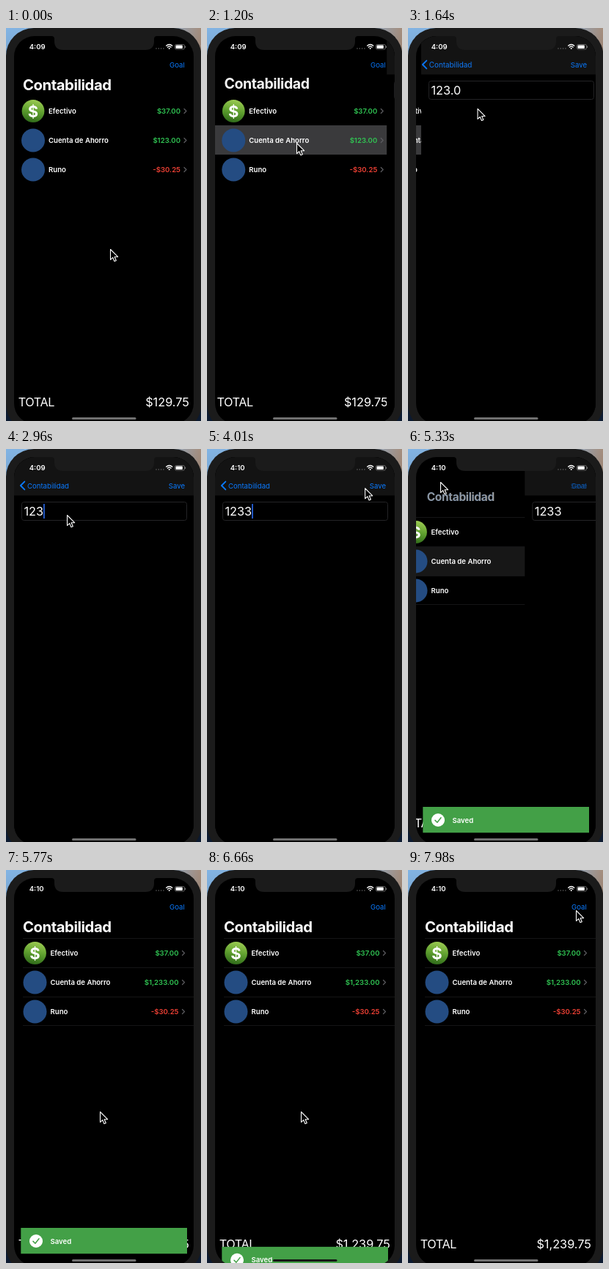
An HTML page for the animation above (8000 ms loop, 266 by 537 pixels).

```html
<!DOCTYPE html>
<html lang="es">
<head>
<meta charset="utf-8">
<title>Contabilidad</title>
<style>
  html, body { margin: 0; width: 100%; height: 100%; overflow: hidden; background: #000; }
  svg { display: block; width: 100vw; height: 100vh; }
  text { font: 400 9.6px Inter, Roboto, sans-serif; fill: #fff; }
  .bold { font-weight: 600; }
  .blue { fill: #0a7aff; }
  .end { text-anchor: end; }
  .total { font-size: 16.3px; }
  .line { fill: none; stroke-linecap: round; stroke-linejoin: round; }
</style>
</head>
<body>
<svg viewBox="0 0 266 537">
  <defs>
    <linearGradient id="desk"><stop stop-color="#82b4e4"/><stop offset=".85" stop-color="#8fa6bd"/><stop offset="1" stop-color="#a58d7c"/></linearGradient>
    <linearGradient id="dusk" x2="0" y2="1"><stop stop-opacity="0"/><stop offset=".9" stop-color="#0c1a30"/></linearGradient>
    <linearGradient id="cash" x1=".6" y1="0" x2=".4" y2="1">
      <stop stop-color="#9ccb52"/><stop offset=".5" stop-color="#5fa02f"/><stop offset="1" stop-color="#2f6a1a"/>
    </linearGradient>
    <linearGradient id="fade" gradientUnits="userSpaceOnUse" x1="205" x2="224">
      <stop stop-color="#fff"/><stop offset="1"/>
    </linearGradient>
    <mask id="fadeOut" maskUnits="userSpaceOnUse" width="266" height="70"><rect width="266" height="70" fill="url(#fade)"/></mask>
    <clipPath id="screen"><rect x="11" y="11" width="245" height="530" rx="28"/></clipPath>
  </defs>

  <rect width="266" height="537" fill="url(#desk)"/>
  <rect width="266" height="537" fill="url(#dusk)"/>
  <rect width="266.5" height="552" rx="38" fill="#1b1b1b"/>

  <g clip-path="url(#screen)">
    <rect width="266" height="537"/>

    <g id="list">
      <rect id="picked" x="11" y="133" width="320" height="40" fill="#3a3a3c"/>
      <path id="rules" d="M23 93.5H340M23 133.5H340M23 173.5H340M23 212.5H340" stroke="#151516"/>
      <g id="left"></g>
      <g id="right"></g>
      <text class="total" x="16.8" y="516.8" letter-spacing="-.5">TOTAL</text>
      <text class="total end" id="sum" x="250" y="516.8"></text>
    </g>

    <g id="detail">
      <rect x="11" width="245" height="537"/>
      <rect x="11" width="245" height="63.5" fill="#131313"/>
      <rect x="21.5" y="72.5" width="225" height="25" rx="3" stroke="#242426"/>
      <text id="value" x="24.5" y="90.8" style="font-size:16.3px"></text>
      <rect id="caret" y="75" width="1.6" height="20" fill="#2a6cf0"/>
    </g>

    <text id="big" class="bold" style="font-size:20.3px;font-weight:700;letter-spacing:-.45px">Contabilidad</text>
    <text id="small" class="blue">Contabilidad</text>
    <text id="goal" class="blue end" x="243.8" y="53.5">Goal</text>
    <text id="save" class="blue end" x="244" y="53.5">Save</text>
    <path id="back" class="line" d="M25.3 44.6L19.9 50L25.3 55.4" stroke="#0a7aff" stroke-width="1.9"/>
    <g mask="url(#fadeOut)"><text class="bold" id="heading" x="92" y="53.5">Cuenta de Ahorro</text></g>

    <path d="M62 11Q66 11 66 15V18Q66 30 78 30H190Q202 30 202 18V15Q202 11 206 11Z" fill="#1b1b1b"/>
    <text class="bold" id="clock" x="31.7" y="29"></text>
    <path class="line" d="M205 28h.01M208.3 28h.01M211.6 28h.01M214.9 28h.01" stroke="#777" stroke-width="1.3"/>
    <path class="line" d="M218.6 24.2Q222.7 20.8 226.8 24.2M220.3 26.2Q222.7 24.2 225.1 26.2" stroke="#fff" stroke-width="1.3"/>
    <circle cx="222.7" cy="28" r="1" fill="#fff"/>
    <rect x="230.5" y="22.5" width="13" height="6.6" rx="1.8" fill="none" stroke="#777" stroke-width=".8"/>
    <rect x="231.6" y="23.6" width="9.2" height="4.4" rx=".8" fill="#fff"/>
    <path d="M244.6 24.6v2.4" stroke="#777"/>

    <g id="toast">
      <rect x="20.3" width="226.7" height="35.3" fill="#43a047"/>
      <circle cx="41" cy="18" r="9" fill="#fff"/>
      <path class="line" d="M37 18.4L39.9 21.3L45 14.8" stroke="#43a047" stroke-width="1.5"/>
      <text class="bold" x="60.5" y="21.5">Saved</text>
    </g>
    <rect id="home" x="90" y="532" width="87.5" height="3" rx="1.5"/>
  </g>

  <path id="mouse" d="M.5 .5V14.6L3.7 11.6L5.9 16.7L8.3 15.7L6.1 10.7H10.6Z" stroke="#fff" stroke-width="1.1" stroke-linejoin="round"/>
</svg>

<script>
const LOOP = 8000, STEP = 147.6;
const $ = id => document.getElementById(id);
const set = (id, attrs) => { for (const k in attrs) $(id).setAttribute(k, attrs[k]); };
const move = (id, x, y = 0, s = 1) => set(id, { transform: `translate(${x} ${y}) scale(${s})` });
const write = (id, s) => { if ($(id).textContent !== s) $(id).textContent = s; };
const lerp = (a, b, k) => a + (b - a) * k;

// Ease-out progress of t through the span from a to b.
const ease = (t, a, b) => 1 - (1 - Math.min(1, Math.max(0, (t - a) / (b - a)))) ** 3;

// Critically damped spring released at time a; it snaps once nearly at rest.
function spring(t, a) {
  const x = Math.max(0, t - a) * .0115, v = 1 - (1 + x) * Math.exp(-x);
  return v > .99 ? 1 : v;
}

// Pointer trips; bow is the sideways swing of the path.
const trips = [
  { from: 0, to: 738, x: 122, y: 157, bow: 38 },
  { from: 1330, to: 2210, x: 83, y: 90 },
  { from: 3690, to: 4280, x: 234, y: 48 },
  { from: 4725, to: 5160, x: 44, y: 45 },
  { from: 5315, to: 5756, x: 128, y: 330 },
  { from: 6790, to: 7970, x: 229, y: 55 },
];
function pointer(t) {
  let x = 142, y = 302;
  for (const p of trips) {
    const k = ease(t, p.from, p.to);
    x = lerp(x, p.x, k) + (p.bow || 0) * Math.sin(Math.PI * k);
    y = lerp(y, p.y, k);
  }
  return [x, y];
}

const rows = [['Efectivo', '$37.00', '#30c553'], ['Cuenta de Ahorro', '', '#30c553'], ['Runo', '-$30.25', '#ee4034']];
rows.forEach(([name, amount, color], i) => {
  const y = 113.5 + 40 * i;
  const icon = i ? `<circle cx="37" cy="${y}" r="16" fill="#244c82"/>`
    : `<circle cx="37" cy="${y}" r="15.4" fill="url(#cash)"/>
       <text x="37" y="${y + 8}" text-anchor="middle" style="font-size:22px;font-weight:700">$</text>`;
  $('left').innerHTML += `${icon}<text class="bold" x="58" y="${y + 3.5}">${name}</text>`;
  $('right').innerHTML += `<text class="bold end" id="amount${i}" x="238" y="${y + 3.5}" style="fill:${color}">${amount}</text>
    <path class="line" d="M243 ${y - 3}l3 3l-3 3" stroke="#5c5c60" stroke-width="1.2"/>`;
});

function draw(now) {
  const t = Math.floor(now % LOOP / STEP) * STEP;
  const q = spring(t, 1152) - spring(t, 5136);
  const top = 489 + 50 * (1 - ease(t, 4471, 4723) + ease(t, 6600, 6795));
  const opened = t > 1100, saved = t > 4700, inset = opened ? 2.5 : 0;

  move('list', -73.5 * q);
  move('left', inset);
  move('right', -inset);
  set('picked', { opacity: saved ? q : +opened });
  set('rules', { opacity: +saved });
  write('amount1', saved ? '$1,233.00' : '$123.00');
  write('sum', saved ? '$1,239.75' : '$129.75');

  move('detail', 245 * (1 - q));
  write('value', t < 2600 ? '123.0' : t < 2900 ? '123.' : t < 3500 ? '123' : '1233');
  set('caret', { x: 24.5 + $('value').getComputedTextLength(), opacity: +(t > 2000 && t < 4250) });

  // The large title shrinks into the back label while the two cross-fade.
  const k = q ** .85, width = lerp(119, 57, k), x = lerp(23, 29, k), base = lerp(85, 53.5, k);
  move('big', x, base, width / 119);
  move('small', x, base, width / 57);
  set('big', { opacity: 1 - q });
  set('small', { opacity: q * q });
  set('goal', { opacity: 1 - q });
  set('save', { opacity: q });
  set('back', { opacity: Math.max(0, 2 * q - 1) });
  set('heading', { opacity: q });
  move('heading', 133 * (1 - q));

  write('clock', t < 3950 ? '4:09' : '4:10');
  move('toast', 0, top);
  set('home', { fill: top > 497 && top < 533 ? '#151515' : '#707070' });
  move('mouse', ...pointer(t));
  requestAnimationFrame(draw);
}
requestAnimationFrame(draw);
</script>
</body>
</html>
```
